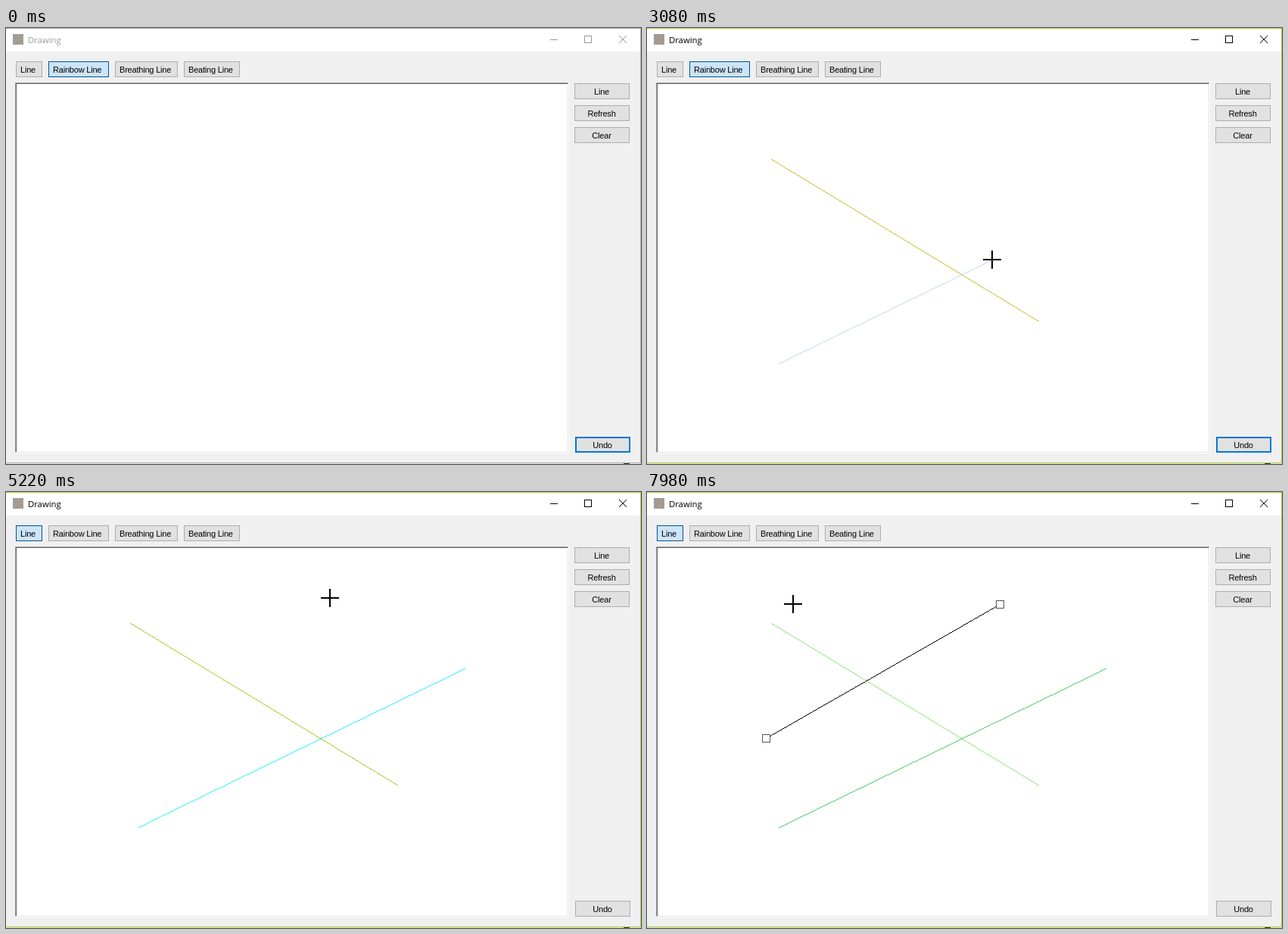
Recreate the animation shown at these times as an HTML page with a canvas. Size 839 by 576 pixels, loop 8 s.

```html
<!DOCTYPE html>
<html lang="en">
<head>
<meta charset="utf-8">
<title>Drawing</title>
<style>
html, body { margin: 0; width: 100%; height: 100%; overflow: hidden; background: #f0f0f0; }
svg, canvas { position: absolute; left: 0; top: 0; width: 839px; height: 576px; }
svg { shape-rendering: crispEdges; --edge: #aaa; --ink: #999; --title: #93a09c; }
svg.active { --edge: #a9cb3c; --ink: #000; --title: #000; }
.edge { fill: var(--edge); }
.glyph { fill: none; stroke: var(--ink); }
.title { font: 11.3px "Open Sans", "Noto Sans", sans-serif; fill: var(--title); }
.btn rect { fill: #e1e1e1; stroke: #adadad; }
.btn text { font: 11px "Liberation Sans", Arial, sans-serif; letter-spacing: -.2px; fill: #000; }
.btn.mid text { text-anchor: middle; }
.btn.hover rect { fill: #e5f1fb; stroke: #0078d7; }
.btn.down rect { fill: #cce4f7; stroke: #005499; }
.btn .focus { display: none; }
.btn.default .focus { display: inline; fill: none; stroke: #0078d7; stroke-width: 2; }
</style>
</head>
<body>
<svg id="win" viewBox="0 0 839 576">
  <rect width="839" height="576" fill="#f0f0f0"/>
  <rect width="838" height="31" fill="#fff"/>
  <rect y="575" width="839" height="1" fill="#e9e9e9"/>
  <rect class="edge" width="839" height="1"/>
  <rect class="edge" x="838" width="1" height="575"/>
  <rect class="edge" y="574" width="839" height="1"/>
  <path d="M816 575.5h8" stroke="#333"/>
  <rect x="9" y="8" width="14" height="14" fill="#a39c94"/>
  <text class="title" x="29" y="20">Drawing</text>
  <path class="glyph" d="M719 15.5h10M764.5 10.5h9v9h-9z"/>
  <path class="glyph" d="M810 10l10 10M820 10l-10 10" shape-rendering="auto"/>
  <path d="M12 72h731v1h-730v489h-1z" fill="#a0a0a0"/>
  <path d="M13 73h729v1h-728v487h-1z" fill="#696969"/>
  <path d="M742 73h1v488h-730v-1h729z" fill="#e3e3e3"/>
  <path d="M743 72h1v490h-732v-1h731z" fill="#fff"/>
  <g id="buttons"></g>
</svg>
<canvas id="view" width="839" height="576"></canvas>
<script>
const LOOP = 8000, STEP = 77, PHASE = 357;
const win = document.getElementById('win');
const ctx = document.getElementById('view').getContext('2d');

function button(label, x, y, w, tx, mid) {
  const g = document.createElementNS(win.namespaceURI, 'g');
  g.innerHTML = `<rect x="${x + .5}" y="${y + .5}" width="${w - 1}" height="20"/>` +
    `<rect class="focus" x="${x + 1}" y="${y + 1}" width="${w - 2}" height="19"/>` +
    `<text x="${x + tx}" y="${y + 15}">${label}</text>`;
  g.setAttribute('class', mid ? 'btn mid' : 'btn');
  document.getElementById('buttons').append(g);
  return g;
}
const tool = (label, x, w) => button(label, x, 44, w, 6);
const side = (label, x, y) => button(label, x, y, 73, 36, true);

const lineBtn = tool('Line', 13, 35);
const rainbowBtn = tool('Rainbow Line', 56, 80);
tool('Breathing Line', 144, 83);
tool('Beating Line', 235, 74);
['Line', 'Refresh', 'Clear'].forEach((label, i) => side(label, 751, 73 + 29 * i));
const undoBtn = side('Undo', 752, 540);

// Pointer moves; a move with a pen draws a line as it goes.
const moves = [
  { start: 100, end: 190, to: [280, 376] },
  { start: 270, end: 700, to: [164, 173] },
  { start: 800, end: 1700, to: [517, 387], pen: 'rainbow' },
  { start: 1800, end: 2350, to: [172, 443] },
  { start: 2450, end: 2600, to: [174, 443] },
  { start: 2600, end: 3350, to: [606, 233], pen: 'rainbow' },
  { start: 3400, end: 3740, to: [238, 161] },
  { start: 3770, end: 4300, to: [28, 57] },
  { start: 4790, end: 5300, to: [466, 148] },
  { start: 5300, end: 5890, to: [157, 325], pen: '#000' },
  { start: 6310, end: 6700, to: [190, 310] },
  { start: 7480, end: 7980, to: [193, 148] }
];
moves.forEach((m, i) => m.from = i ? moves[i - 1].to : [370, 430]);
const lines = moves.filter(m => m.pen);

// Rainbow pens step through this palette, one colour per repaint.
const palette = ['#50cc6e', '#c8c032', '#7a3cc8', '#8a8a6e', '#c4dcec', '#d2643c', '#e496cc',
  '#1eac5a', '#5a78e0', '#2848b8', '#ec32aa', '#3ca0a0', '#a0d228', '#b44c96', '#8cec78',
  '#32f0fa', '#8c5078'];

function along(m, t) {
  const k = Math.min(1, Math.max(0, (t - m.start) / (m.end - m.start)));
  const e = k * k * (3 - 2 * k);
  return m.from.map((a, i) => Math.round(a + (m.to[i] - a) * e));
}

// Hard-edged one pixel line
function stroke([x0, y0], [x1, y1], color) {
  const n = Math.max(Math.abs(x1 - x0), Math.abs(y1 - y0), 1);
  ctx.fillStyle = color;
  for (let i = 0; i <= n; i++)
    ctx.fillRect(Math.round(x0 + (x1 - x0) * i / n), Math.round(y0 + (y1 - y0) * i / n), 1, 1);
}

function handle([x, y]) {
  ctx.fillStyle = '#fff';
  ctx.fillRect(x - 5, y - 5, 11, 11);
  ctx.strokeStyle = '#555';
  ctx.strokeRect(x - 4.5, y - 4.5, 10, 10);
}

// The cross inverts what lies beneath it.
function cross(x, y) {
  ctx.globalCompositeOperation = 'difference';
  ctx.fillStyle = '#fff';
  ctx.fillRect(x - 12, y - 1, 24, 2);
  ctx.fillRect(x - 1, y - 12, 2, 11);
  ctx.fillRect(x - 1, y + 1, 2, 11);
  ctx.globalCompositeOperation = 'source-over';
}

function arrow(x, y) {
  const p = new Path2D('M.5 .5V16.5L4 13L6.5 18.5L9 17.5L6.8 12H11.5Z');
  ctx.save();
  ctx.translate(x - 1, y - 1);
  ctx.fillStyle = '#fff';
  ctx.strokeStyle = '#000';
  ctx.fill(p);
  ctx.stroke(p);
  ctx.restore();
}

function draw(step) {
  const t = PHASE + STEP * step;
  const [x, y] = along(moves.filter(m => m.start <= t).pop() || moves[0], t);
  const over = x >= 13 && x < 48 && y >= 44 && y < 65;
  win.classList.toggle('active', t >= 740);
  lineBtn.classList.toggle('hover', over);
  lineBtn.classList.toggle('down', t >= 4590);
  rainbowBtn.classList.toggle('down', t < 4660);
  undoBtn.classList.toggle('default', t < 4590);

  ctx.clearRect(0, 0, 839, 576);
  ctx.fillStyle = '#fff';
  ctx.fillRect(14, 74, 728, 486);
  lines.forEach((l, n) => {
    if (t < l.start) return;
    const color = l.pen === 'rainbow' ? palette[(step + 3 * n) % palette.length] : l.pen;
    stroke(l.from, along(l, t), color);
  });
  if (t >= 7220) {
    handle(lines[2].from);
    handle(lines[2].to);
  }
  if (t < moves[0].start) return;
  if (x >= 14 && y >= 74) cross(x, y);
  else arrow(x, y);
}

const begin = performance.now();
let shown = null;
function loop() {
  const now = (performance.now() - begin) % LOOP;
  const step = Math.floor((now - PHASE) / STEP);
  if (step !== shown) draw(shown = step);
  requestAnimationFrame(loop);
}
loop();
</script>
</body>
</html>
```
